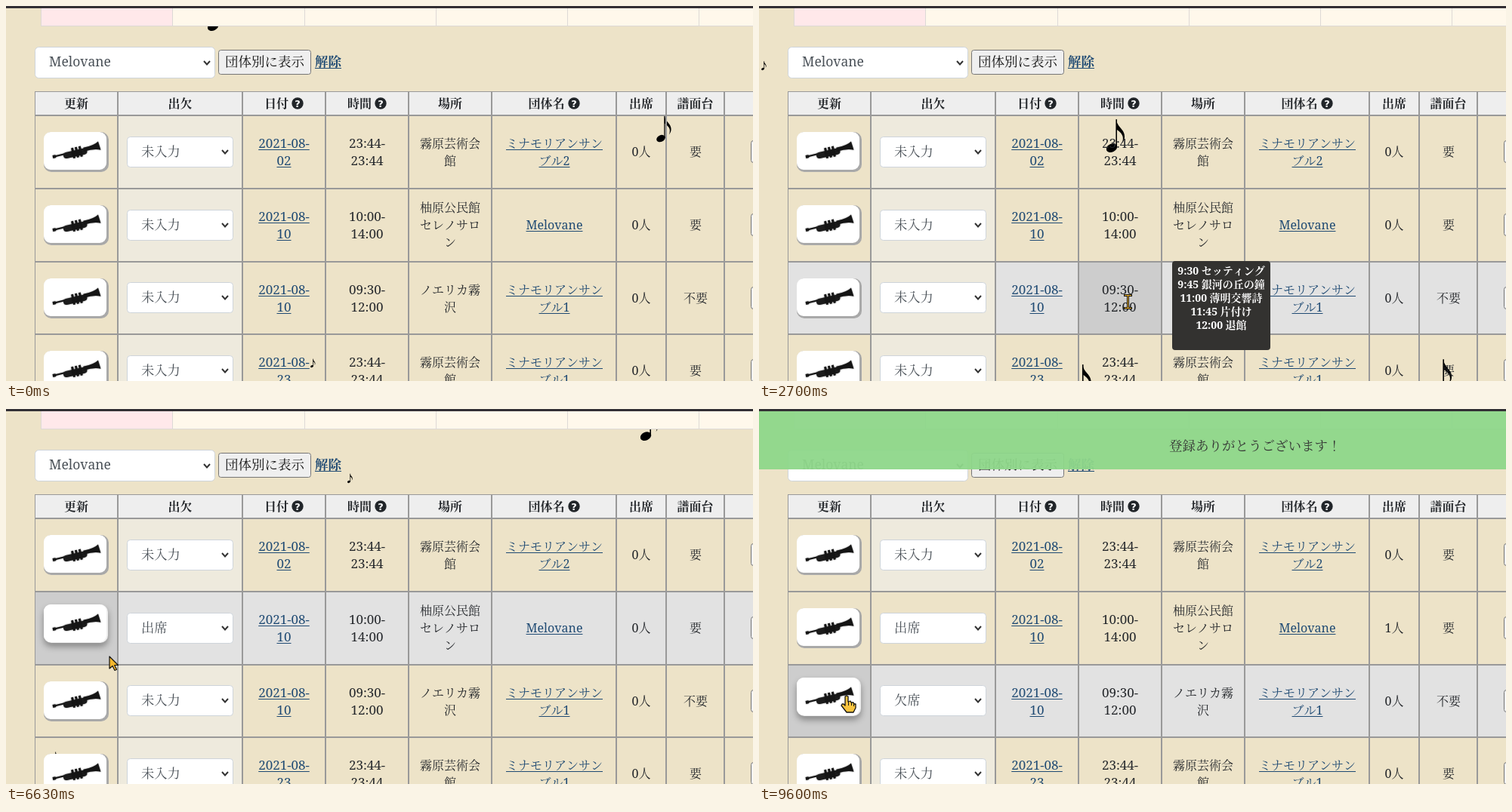
Recreate the animation shown at these times as an HTML page with a canvas. Size 989 by 497 pixels, loop 9.67 s.

```html
<!DOCTYPE html>
<html lang="ja">
<head>
<meta charset="utf-8">
<title>出欠表</title>
<style>
html, body { margin: 0; width: 100%; height: 100%; overflow: hidden; background: #ede3c8; }
canvas { display: block; width: 989px; height: 497px; }
</style>
</head>
<body>
<canvas id="stage" width="989" height="497"></canvas>
<script>
const c = document.getElementById('stage').getContext('2d');
const LOOP = 9670;
const FACE = '"Noto Serif", "Noto Serif CJK JP", "Noto Sans CJK JP", "Noto Sans CJK", serif';
const INK = '#24272b', LINK = '#1f4a73', SOFT = '#495057', PAPER = '#ede3c8', RULE = '#999';

const cols = [38, 148, 313, 423, 533, 643, 808, 874, 951, 1060];
const rowY = [145, 242, 339, 435, 532];
const heads = ['更新', '出欠', '日付', '時間', '場所', '団体名', '出席', '譜面台'];
const CLUB = 'ミナモリアンサン';
const rows = [
  { date: ['2021-08-', '02'], time: ['23:44-', '23:44'], place: ['霧原芸術会', '館'], club: [CLUB, 'ブル2'], stand: '要' },
  { date: ['2021-08-', '10'], time: ['10:00-', '14:00'], place: ['柚原公民館', 'セレノサロ', 'ン'], club: ['Melovane'], stand: '要' },
  { date: ['2021-08-', '10'], time: ['09:30-', '12:00'], place: ['ノエリカ霧', '沢'], club: [CLUB, 'ブル1'], stand: '不要' },
  { date: ['2021-08-', '23'], time: ['23:44-', '23:44'], place: ['霧原芸術会', '館'], club: [CLUB, 'ブル1'], stand: '要' }
];
const options = ['未入力', '出席', '欠席', '遅刻', '早退'];

const tips = {
  1: { x: 544, y: 205, w: 140, h: 154, lines: ['10:00 セッティング', '10:15 ガルノフ', '10:40 湖畔館の窓',
    '12:00 連絡会・休憩', '12:15 レーヴェルノ', '13:15 片付け', '13:30 退館'] },
  2: { x: 547, y: 338, w: 130, h: 118, lines: ['9:30 セッティング', '9:45 銀河の丘の鐘', '11:00 薄明交響詩',
    '11:45 片付け', '12:00 退館'] }
};

// [row, from, to]
const tipTimes = [[1, 850, 1880], [2, 1930, 4000], [1, 4060, 4700]];
const openTimes = [[1, 4930, 5850], [2, 7400, 8100]];
const liftTimes = [[1, 6060, 6680], [2, 8800, 9900]];

// pointer path: time, x, y
const path = [
  [150, 720, 520], [700, 600, 310], [950, 485, 293], [1690, 485, 293], [2100, 488, 392], [3850, 488, 392],
  [4150, 484, 300], [4600, 484, 296], [4880, 270, 300], [5450, 270, 300], [5700, 215, 348], [5900, 215, 348],
  [6150, 112, 290], [6350, 112, 290], [6630, 137, 328], [6800, 165, 350], [7150, 255, 388], [7300, 255, 388],
  [7480, 249, 422], [7520, 249, 422], [7950, 210, 466], [8200, 210, 466], [8450, 205, 462], [8900, 115, 380]
];

// falling notes: head x, bottom y, at time, scale, fall px/s, drift px/s
const notes = [
  [274, 33, 0, 1, 180, 55], [900, 26, 0, 1, 180, 0], [867, 180, 0, .8, 340, 0], [405, 479, 0, .26, 97, 0],
  [467, 194, 2700, 1, 180, 14], [5, 85, 2700, .27, 97, 15], [71, 101, 4970, .26, 97, 0],
  [454, 98, 6630, .28, 97, -20], [847, 42, 6630, 1, 180, 0], [33.5, 424, 7510, .7, 165, -20]
];

const clamp = v => Math.max(0, Math.min(1, v));
const smooth = v => { v = clamp(v); return v * v * (3 - 2 * v); };
const pulse = (t, a, b, d) => Math.min(smooth((t - a) / d), 1 - smooth((t - b) / d));
const rect = (x, y, w, h, fill) => { c.fillStyle = fill; c.fillRect(x, y, w, h); };

function box(x, y, w, h, r, fill, line, lw = 1) {
  c.beginPath();
  c.roundRect(x, y, w, h, r);
  if (fill) { c.fillStyle = fill; c.fill(); }
  if (line) { c.strokeStyle = line; c.lineWidth = lw; c.stroke(); }
}

function text(s, x, y, size, color, weight = 400, align = 'left', under = false) {
  c.font = `${weight} ${size}px ${FACE}`;
  c.textAlign = align;
  c.fillStyle = color;
  c.fillText(s, x, y);
  if (under) {
    const w = c.measureText(s).width;
    c.fillRect(align === 'center' ? x - w / 2 : x, Math.round(y + 2), w, 1);
  }
}

function lines(list, x, cy, size, color, under) {
  list.forEach((s, i) => text(s, x, cy + 6 + (i - (list.length - 1) / 2) * 23, size, color, 500, 'center', under));
}

function poly(points, fill, line, lw) {
  c.beginPath();
  points.forEach(p => c.lineTo(p[0], p[1]));
  c.closePath();
  c.fillStyle = fill;
  c.fill();
  if (line) { c.strokeStyle = line; c.lineWidth = lw; c.lineJoin = 'round'; c.stroke(); }
}

function drawNote([x, y, at, s, fall, drift], t) {
  const dt = (t - at) / 1000;
  const py = y + fall * dt;
  if (py < -10 || py > 560) return;
  c.save();
  c.translate(x + drift * dt, py);
  c.scale(s, s);
  c.fillStyle = c.strokeStyle = '#000';
  c.beginPath();
  c.ellipse(0, -6, 7.6, 5.4, -.45, 0, 7);
  c.fill();
  c.lineWidth = Math.max(1.6, .7 / s);
  c.beginPath();
  c.moveTo(6.2, -7);
  c.lineTo(6.2, -44);
  c.stroke();
  c.beginPath();
  c.moveTo(6, -44);
  c.bezierCurveTo(7, -33, 18, -31, 17, -20);
  c.quadraticCurveTo(17, -16, 13.5, -12);
  c.bezierCurveTo(18, -23, 11, -27, 6, -31);
  c.fill();
  c.restore();
}

function chevron(x, y) {
  c.strokeStyle = '#333';
  c.lineWidth = 2;
  c.beginPath();
  c.moveTo(x - 4, y - 2);
  c.lineTo(x, y + 2.5);
  c.lineTo(x + 4, y - 2);
  c.stroke();
}

function trumpet() {
  c.save();
  c.translate(43, 25);
  c.rotate(-.22);
  c.fillStyle = c.strokeStyle = '#151515';
  c.shadowColor = 'rgba(0,0,0,.45)';
  c.shadowBlur = 2;
  c.lineCap = 'round';
  c.lineWidth = 2;
  c.beginPath();
  c.moveTo(-31, 1);
  c.lineTo(24, 0);
  c.stroke();
  rect(-32, -1, 4, 4, '#151515');
  box(-18, -1, 32, 8, 4, '#1c1c1c');
  for (const x of [-6, -1, 4]) rect(x, -5, 3, 14, '#151515');
  c.beginPath();
  c.moveTo(10, -2);
  c.quadraticCurveTo(25, -2, 31, -6);
  c.lineTo(32, 6);
  c.quadraticCurveTo(24, 2, 10, 3);
  c.fill();
  c.restore();
}

function hornButton(y, lift) {
  c.save();
  c.translate(50, y - 5 * lift);
  if (lift > 0) {
    c.save();
    c.shadowColor = `rgba(0,0,0,${.35 * lift})`;
    c.shadowBlur = 9;
    c.shadowOffsetY = 5;
    box(0, 0, 85, 51, 10, '#fff');
    c.restore();
  }
  c.globalAlpha = 1 - lift * .8;
  box(0, 0, 86, 53, 10, '#a9a9a9');
  c.globalAlpha = 1;
  box(0, 0, 83, 50, 9, '#fff');
  trumpet();
  c.restore();
}

function selectBox(y, label, focus) {
  if (focus) box(158.5, y - 1.5, 144, 44, 6, null, '#9dc8f7', 4);
  box(160.5, y + .5, 140, 40, 4, '#fff', focus ? '#80bdff' : '#ced4da');
  text(label, 179, y + 26, 17.3, SOFT, 300);
  chevron(290, y + 20);
}

function topPart() {
  rect(46, 3, 943, 24, '#fff8eb');
  rect(46, 3, 174, 24, '#ffe8ea');
  for (const x of [46, 220, 395, 569, 743, 917]) rect(x, 3, 1, 24, '#ddd9d6');
  rect(46, 26, 943, 1, '#ddd9d6');
  rect(0, 0, 989, 3, '#333035');
  box(38.5, 54.5, 238, 41, 5, '#fff', '#ced4da');
  text('Melovane', 57, 80, 17.5, SOFT, 300);
  chevron(266, 75);
  box(281.5, 58.5, 122, 32, 3, '#efefef', '#767676');
  text('団体別に表示', 290, 80, 17.5, '#111', 300);
  text('解除', 409, 80, 17.5, LINK, 700, 'left', true);
}

function header() {
  rect(38, 113, 951, 32, '#eee');
  heads.forEach((s, i) => {
    const help = { 2: 386, 3: 496, 5: 752 }[i];
    const x = (cols[i] + cols[i + 1]) / 2 - (help ? 10 : 0);
    text(s, x, 135, 16, INK, 700, 'center');
    if (help) {
      c.fillStyle = '#212529';
      c.beginPath();
      c.arc(help, 129, 7.7, 0, 7);
      c.fill();
      c.font = 'bold 13px "DejaVu Sans", sans-serif';
      c.fillStyle = '#fff';
      c.fillText('?', help, 134);
    }
  });
}

function table(t, hot, cell, open) {
  header();
  rows.forEach((r, i) => {
    const y = rowY[i], h = rowY[i + 1] - y, cy = [193, 290, 387, 483][i];
    const pick = i === 1 && t >= 5850 ? 1 : i === 2 && t >= 8100 ? 2 : 0;
    if (hot === i) rect(39, y, 950, h, '#e2e2e2');
    if (!pick) rect(148, y, 165, h, '#eeeadd');
    if (hot === i && cell >= 0) rect(cols[cell], y, cols[cell + 1] - cols[cell], h, '#cdcdcd');
    const lift = liftTimes.reduce((m, [k, a, b]) => k === i ? Math.max(m, pulse(t, a, b, 150)) : m, 0);
    hornButton(cy - 26, lift);
    selectBox(cy - 20 - (i === 2 ? 1 : 0), options[pick], open === i);
    lines(r.date, 368, cy, 17, LINK, true);
    lines(r.time, 478, cy, 17, INK);
    lines(r.place, 588, cy, 16, INK);
    lines(r.club, 726, cy, 16, LINK, true);
    lines([(i === 1 && t >= 6950 ? 1 : 0) + '人'], 841, cy, 16, INK);
    lines([r.stand], 913, cy, 16, INK);
    box(986.5, cy - 14.5, 30, 29, 3, '#efefef', '#767676');
  });
  rect(38, 113, 951, 1, RULE);
  rect(38, 113, 1, 384, RULE);
  for (const y of rowY.slice(0, 4)) rect(38, y - 1, 951, 2, RULE);
  for (const x of cols.slice(1, 9)) rect(x - 1, 113, 2, 384, RULE);
}

function tooltip(tip, alpha) {
  c.globalAlpha = alpha;
  box(tip.x, tip.y, tip.w, tip.h, 4, '#333230');
  tip.lines.forEach((s, i) => text(s, tip.x + tip.w / 2, tip.y + 18 + i * 18, 14, '#fff', 700, 'center'));
  c.globalAlpha = 1;
}

function dropdown(row, py) {
  const top = row === 1 ? 310 : 407;
  const on = Math.max(0, Math.min(4, Math.floor((py - top - 2) / 22.5)));
  c.save();
  c.shadowColor = 'rgba(0,0,0,.35)';
  c.shadowBlur = 5;
  c.shadowOffsetY = 2;
  rect(160, top, 141, 116, '#fff');
  c.restore();
  box(160.5, top + .5, 140, 115, 0, '#fff', '#767676');
  options.forEach((s, i) => {
    if (i === on) rect(161, top + 1 + i * 22.5, 139, 24, '#1e90ff');
    text(s, 179, top + 18 + i * 22.5, 17.3, i === on ? '#fff' : '#495057', 300);
  });
}

function banner(t) {
  let fade = 0, alpha = 0;
  if (t >= 6950 && t < 8750) {
    fade = smooth((t - 6950) / 500);
    alpha = 1 - smooth((t - 8450) / 300);
  } else if (t >= 9300) alpha = 1;
  if (!alpha) return;
  const mix = (a, b) => Math.round(a + (b - a) * fade);
  c.globalAlpha = alpha * .95;
  rect(0, 3, 989, 77, `rgb(${mix(143, 200)},${mix(215, 235)},${mix(139, 198)})`);
  c.globalAlpha = alpha;
  text('登録ありがとうございます！', 543, 55, 17.5, '#333', 300);
  c.globalAlpha = 1;
}

function pointerAt(t) {
  if (t < path[0][0]) return null;
  let i = path.findIndex(p => p[0] > t);
  if (i < 0) return path[path.length - 1].slice(1);
  const a = path[i - 1], b = path[i], k = smooth((t - a[0]) / (b[0] - a[0]));
  return [a[1] + (b[1] - a[1]) * k, a[2] + (b[2] - a[2]) * k];
}

function drawPointer(x, y, kind) {
  const gold = '#f5b82e';
  c.save();
  c.translate(Math.round(x), Math.round(y));
  if (kind === 'beam') {
    for (const [color, g] of [['#111', 1], [gold, 0]]) {
      rect(-4 - g, -9 - g, 9 + 2 * g, 1 + 2 * g, color);
      rect(-4 - g, 8 - g, 9 + 2 * g, 1 + 2 * g, color);
      rect(-g, -9, 1 + 2 * g, 18, color);
    }
  } else if (kind === 'hand') {
    poly([[-1, 1], [1, 0], [3, 1], [3, 8], [6, 7], [7, 9], [10, 9], [11, 11], [13, 11], [13, 16], [10, 22],
      [1, 22], [-6, 13], [-5, 11], [-3, 11], [-1, 13]], '#f8c440', '#111', 1.3);
    rect(3, 8, 1, 5, '#111');
    rect(7, 9, 1, 4, '#111');
    rect(10, 10, 1, 4, '#111');
  } else {
    poly([[0, 0], [0, 16], [4, 12.5], [7, 18.5], [9.5, 17.3], [6.7, 11.5], [11.5, 11.5]], gold, '#111', 1.2);
  }
  c.restore();
}

function draw(t) {
  const p = pointerAt(t);
  const opened = openTimes.find(o => t >= o[1] && t < o[2]);
  const open = opened ? opened[0] : -1;
  let hot = -1, cell = -1;
  if (p) {
    hot = rowY.findIndex((y, i) => i < 4 && p[1] >= y && p[1] < rowY[i + 1]);
    cell = cols.findIndex((x, i) => p[0] >= x && p[0] < cols[i + 1]);
  }
  if (open >= 0) { hot = open; cell = 1; }

  rect(0, 0, 989, 497, PAPER);
  notes.forEach(n => drawNote(n, t));
  topPart();
  table(t, hot, cell, open);
  for (const [row, a, b] of tipTimes) {
    const alpha = pulse(t, a, b, 150);
    if (alpha > 0) tooltip(tips[row], alpha);
  }
  if (open >= 0) dropdown(open, p[1]);
  banner(t);
  if (p) {
    const top = [167, 264, 361, 457][hot];
    const onHorn = cell === 0 && p[0] > 50 && p[0] < 135 && p[1] > top && p[1] < top + 52;
    drawPointer(p[0], p[1], cell === 3 && hot >= 0 ? 'beam' : onHorn ? 'hand' : 'arrow');
  }
}

const start = performance.now();
function tick() {
  draw((performance.now() - start) % LOOP);
  requestAnimationFrame(tick);
}
tick();
</script>
</body>
</html>
```
